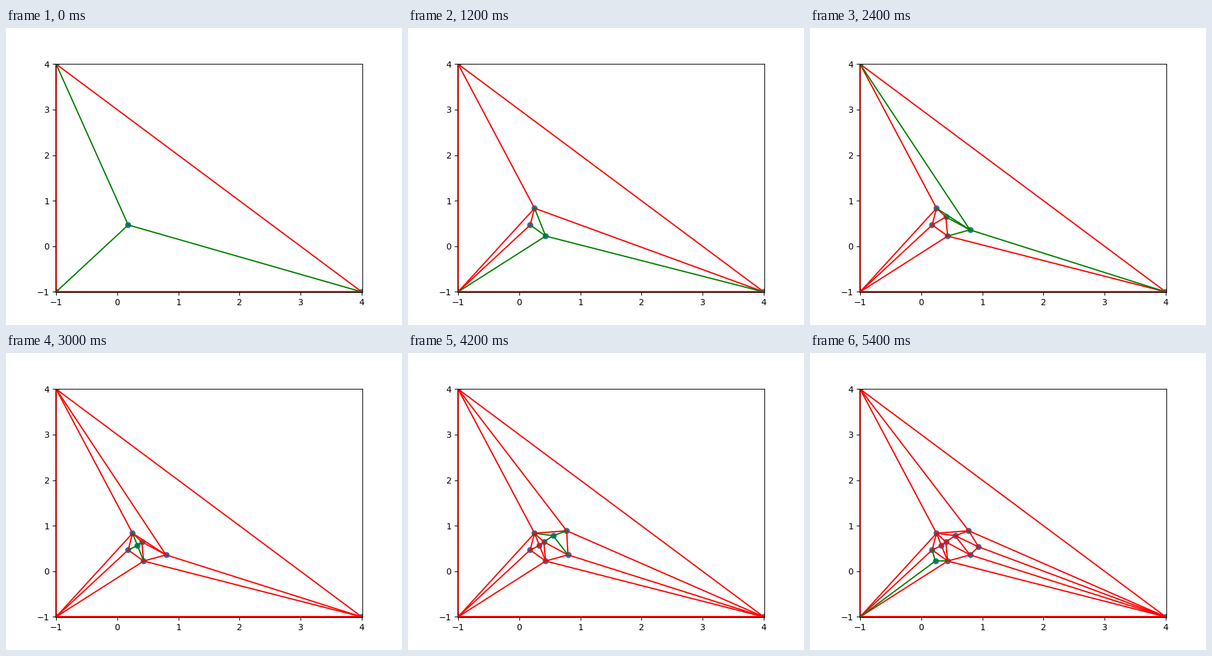
Recreate the animation shown at these times as a matplotlib script. Size 640 px wide and 480 px high, loop 6000 ms.

```python
from itertools import combinations

import matplotlib.pyplot as plt
import numpy as np
from matplotlib.animation import FuncAnimation

# Corners of the enclosing triangle, then the points in order of insertion.
POINTS = np.array([
    (-1, -1), (4, -1), (-1, 4),
    (0.179, 0.469), (0.250, 0.836), (0.432, 0.225), (0.402, 0.646),
    (0.797, 0.361), (0.330, 0.566), (0.776, 0.890), (0.554, 0.782),
    (0.938, 0.537), (0.230, 0.225),
])
STEPS = len(POINTS) - 3
PAD = 0.01


def in_circle(tri, p):
    """Tell whether point p lies inside the circumcircle of a triangle."""
    a, b, c = POINTS[list(tri)]
    rhs = [b @ b - a @ a, c @ c - a @ a]
    centre = np.linalg.solve(2 * np.array([b - a, c - a]), rhs)
    return np.sum((POINTS[p] - centre) ** 2) < np.sum((a - centre) ** 2)


def insert(tris, p):
    """Add point p to a Delaunay triangulation (Bowyer-Watson)."""
    bad = [t for t in tris if in_circle(t, p)]
    sides = [e for t in bad for e in combinations(t, 2)]
    rim = [e for e in sides if sides.count(e) == 1]
    return [t for t in tris if t not in bad] + [(*e, p) for e in rim]


def edges_after(step):
    newest = step + 3
    tris = [(0, 1, 2)]
    for p in range(3, newest + 1):
        tris = insert(tris, p)
    edges = {e for t in tris for e in combinations(t, 2)}
    # The newest point's edges come last, on top of the settled ones.
    return sorted(edges, key=lambda e: (e[1] == newest, e)), newest


def draw(step):
    ax.cla()
    ax.set(xlim=(-1 - PAD, 4 + PAD), ylim=(-1 - PAD, 4 + PAD),
           xticks=range(-1, 5), yticks=range(-1, 5))
    edges, newest = edges_after(step)
    ax.scatter(*POINTS[:newest + 1].T, color="tab:blue")
    for e in edges:
        ax.plot(*POINTS[list(e)].T, color="green" if newest in e else "red")
    return []


fig, ax = plt.subplots(figsize=(6.4, 4.8), dpi=100)
anim = FuncAnimation(fig, draw, frames=STEPS, interval=600,
                     init_func=lambda: draw(0), repeat=True, repeat_delay=0)
plt.show()
```
